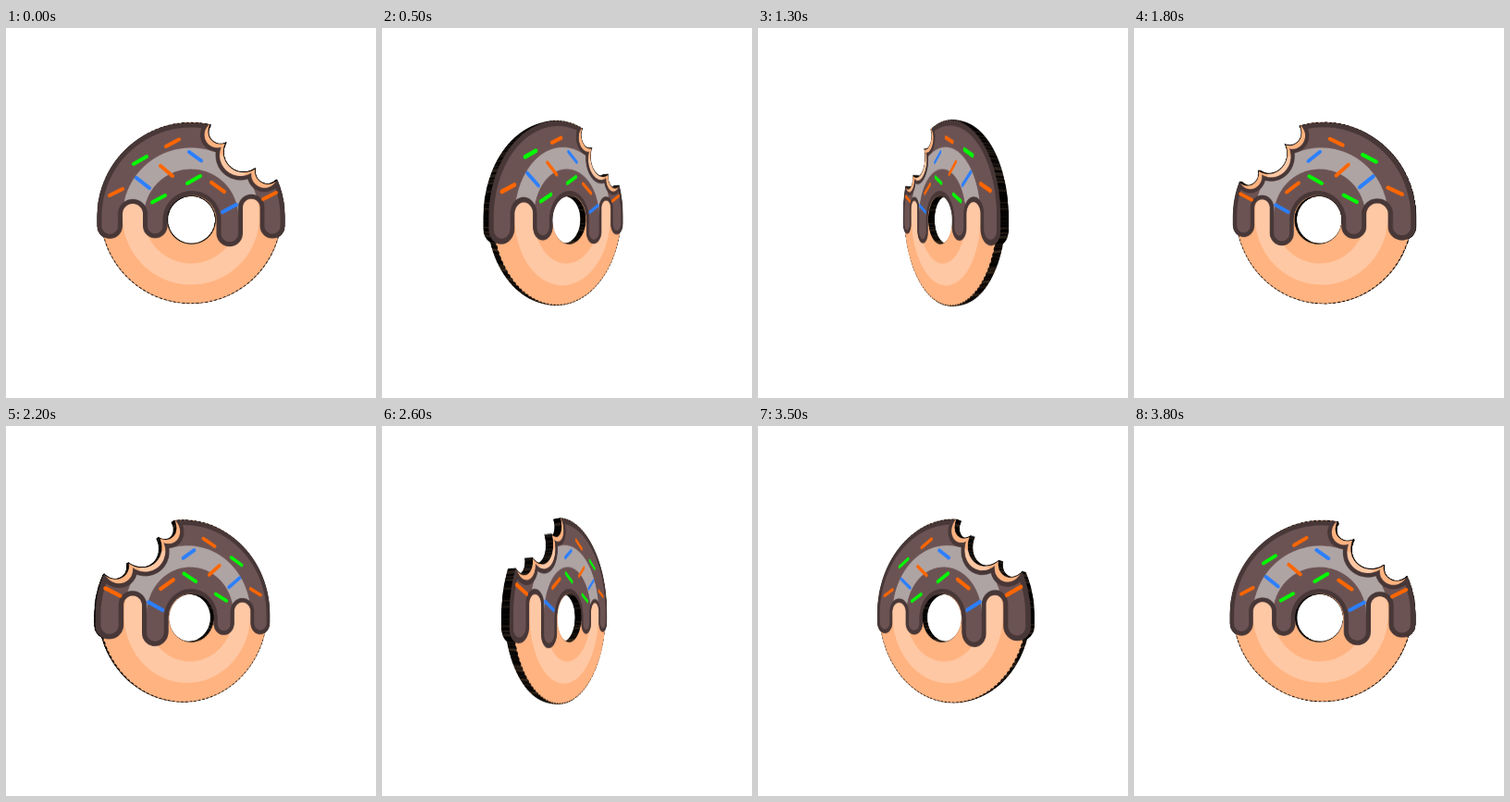
An HTML page with a canvas that plays this animation: 400 by 400 pixels, repeating every 3900 ms.

```html
<!DOCTYPE html>
<html lang="en">
<head>
<meta charset="utf-8">
<title>Spinning donut</title>
<style>
  html, body { margin: 0; width: 100%; height: 100%; overflow: hidden; background: #fff; }
  canvas { display: block; }
</style>
</head>
<body>
<canvas id="stage" width="400" height="400"></canvas>
<script>
const LOOP = 3900, STEP = 100;
const CENTER = 200, HALF = 108, SCALE = 3;
const PERSPECTIVE = 350, DEPTH = 8.4, LAYERS = 16;
// The artwork is drawn at the size it has when facing the viewer.
const FRONT_ZOOM = PERSPECTIVE / (PERSPECTIVE - DEPTH / 2);
const TAU = Math.PI * 2;

const BITES = [[232, 112, 13], [257, 134, 21.5], [283, 155, 13.3]];
const ORANGE = '#ff6600', GREEN = '#00ff00', BLUE = '#2a7fff';
const SPRINKLES = [
  [ORANGE, 173, 128, 187, 120.5],
  [GREEN, 138, 147, 152, 139],
  [BLUE, 198, 134, 211, 143.5],
  [ORANGE, 167, 149, 180, 160],
  [BLUE, 141, 162, 155, 173],
  [ORANGE, 112, 181, 126, 174],
  [GREEN, 196, 168, 210, 160],
  [GREEN, 158, 188.5, 172, 181],
  [ORANGE, 222, 167, 236, 177],
  [BLUE, 234, 199, 249, 191],
  [ORANGE, 278, 185, 292, 178]
];
const ICING = new Path2D(
  'M101 204 A99 99 0 0 1 299 204 V214 A11 11 0 0 1 277 214 V194 ' +
  'A11.75 11.75 0 0 0 253.5 194 V222 A11.75 11.75 0 0 1 230 222 V207.5 ' +
  'A29 29 0 0 0 172 207.5 V214 A10.75 10.75 0 0 1 150.5 214 V201 ' +
  'A13.5 13.5 0 0 0 123.5 201 V214 A11.25 11.25 0 0 1 101 214 Z');

// A texture addressed in stage coordinates around the donut's centre.
function makeLayer() {
  const canvas = document.createElement('canvas');
  canvas.width = canvas.height = 2 * HALF * SCALE;
  const g = canvas.getContext('2d');
  g.scale(SCALE, SCALE);
  g.translate(HALF - CENTER, HALF - CENTER);
  return g;
}

function disc(g, x, y, r, color) {
  g.fillStyle = color;
  g.beginPath();
  g.arc(x, y, r, 0, TAU);
  g.fill();
}

function ring(g, x, y, r, width, color, start = 0) {
  g.strokeStyle = color;
  g.lineWidth = width;
  g.beginPath();
  g.arc(x, y, r, start, TAU);
  g.stroke();
}

function stamp(g, layer) {
  g.drawImage(layer.canvas, CENTER - HALF, CENTER - HALF, 2 * HALF, 2 * HALF);
}

function makeIcing() {
  const g = makeLayer();
  g.fillStyle = '#6c5353';
  g.fill(ICING);
  g.globalCompositeOperation = 'source-atop';
  ring(g, 200, 203.5, 62.5, 23, '#afa4a4', Math.PI);
  g.globalCompositeOperation = 'source-over';
  g.strokeStyle = '#483737';
  g.lineWidth = 5;
  g.stroke(ICING);
  g.globalCompositeOperation = 'source-atop';
  for (const [x, y, r] of BITES) disc(g, x - 3.5, y + 3.5, r + 5.5, '#483737');
  g.lineCap = 'round';
  g.lineWidth = 4;
  for (const [color, x1, y1, x2, y2] of SPRINKLES) {
    g.strokeStyle = color;
    g.beginPath();
    g.moveTo(x1, y1);
    g.lineTo(x2, y2);
    g.stroke();
  }
  g.globalCompositeOperation = 'destination-out';
  for (const [x, y, r] of BITES) disc(g, x - 3.5, y + 3.5, r + 1, '#000');
  return g;
}

function makeFace() {
  const g = makeLayer();
  disc(g, 200, 200, 98, '#ffb380');
  ring(g, 200, 203.5, 62.5, 23, '#ffc8a4');
  g.setLineDash([3, 2]);
  ring(g, 200, 200, 97.7, 0.7, '#000');
  g.setLineDash([]);
  stamp(g, makeIcing());
  g.globalCompositeOperation = 'source-atop';
  for (const [x, y, r] of BITES) ring(g, x, y, r, 1.2, '#000');
  g.globalCompositeOperation = 'destination-out';
  disc(g, 200.5, 207.5, 26.3, '#000');
  for (const [x, y, r] of BITES) disc(g, x, y, r, '#000');
  g.fill(new Path2D('M222 104 L239 123 L270 152 L294 164 H320 V80 H224 Z'));
  return g;
}

// Donut silhouette filled with irregular one-pixel rows.
function makeRim(face, icingRows, doughRows) {
  const g = makeLayer();
  stamp(g, face);
  g.globalCompositeOperation = 'source-atop';
  for (let y = CENTER - HALF; y < CENTER + HALF; y++) {
    const noise = Math.abs(Math.sin(y * 127.1) * 4375.85) % 1;
    const rows = y < 227 ? icingRows : doughRows;
    g.fillStyle = rows[Math.floor(noise * rows.length)];
    g.fillRect(CENTER - HALF, y, 2 * HALF, 1);
  }
  return g;
}

const face = makeFace();
const darkRim = makeRim(face, ['#000', '#080605', '#0d0a09', '#2a211a'],
                              ['#040302', '#0d0906', '#1c140e', '#34281d']);
const litRim = makeRim(face, ['#171111', '#241c1c', '#352a2a', '#2b2121'],
                             ['#806750', '#8e725a', '#967960', '#8a6e57']);

const ctx = document.getElementById('stage').getContext('2d');
ctx.imageSmoothingQuality = 'high';

// Projects a layer at depth z, turned about the vertical axis, column by column.
function project(layer, angle, z) {
  const c = Math.cos(angle), s = Math.sin(angle);
  const sourceX = u =>
    (PERSPECTIVE * z * s - u * (PERSPECTIVE - z * c)) / (u * s - PERSPECTIVE * c);
  const texel = SCALE * FRONT_ZOOM;
  const limit = HALF / FRONT_ZOOM;
  for (let u = -115; u < 115; u++) {
    const a = sourceX(u), b = sourceX(u + 1), mid = sourceX(u + 0.5);
    if (Math.abs(mid) > limit - 2 || Math.abs(a - b) > 60) continue;
    const left = Math.max(-limit, Math.min(a, b));
    const right = Math.min(limit, Math.max(a, b));
    const k = PERSPECTIVE / (PERSPECTIVE + mid * s - z * c);
    ctx.drawImage(layer.canvas,
      (left + limit) * texel, 0, (right - left) * texel, 2 * HALF * SCALE,
      CENTER + u, CENTER - limit * k, 1, 2 * limit * k);
  }
}

function draw(time) {
  const angle = time / LOOP * TAU;
  const c = Math.cos(angle);
  const front = Math.sign(c) * DEPTH / 2;
  const rim = Math.abs(c) < 0.25 ? litRim : darkRim;
  ctx.fillStyle = '#fff';
  ctx.fillRect(0, 0, 400, 400);
  for (let i = LAYERS; i > 0; i--) project(rim, angle, front * (1 - 2 * i / LAYERS));
  project(face, angle, front);
}

let shown = -1;
function tick() {
  const time = Math.floor(performance.now() % LOOP / STEP) * STEP;
  if (time !== shown) draw(shown = time);
  requestAnimationFrame(tick);
}
tick();
</script>
</body>
</html>
```
